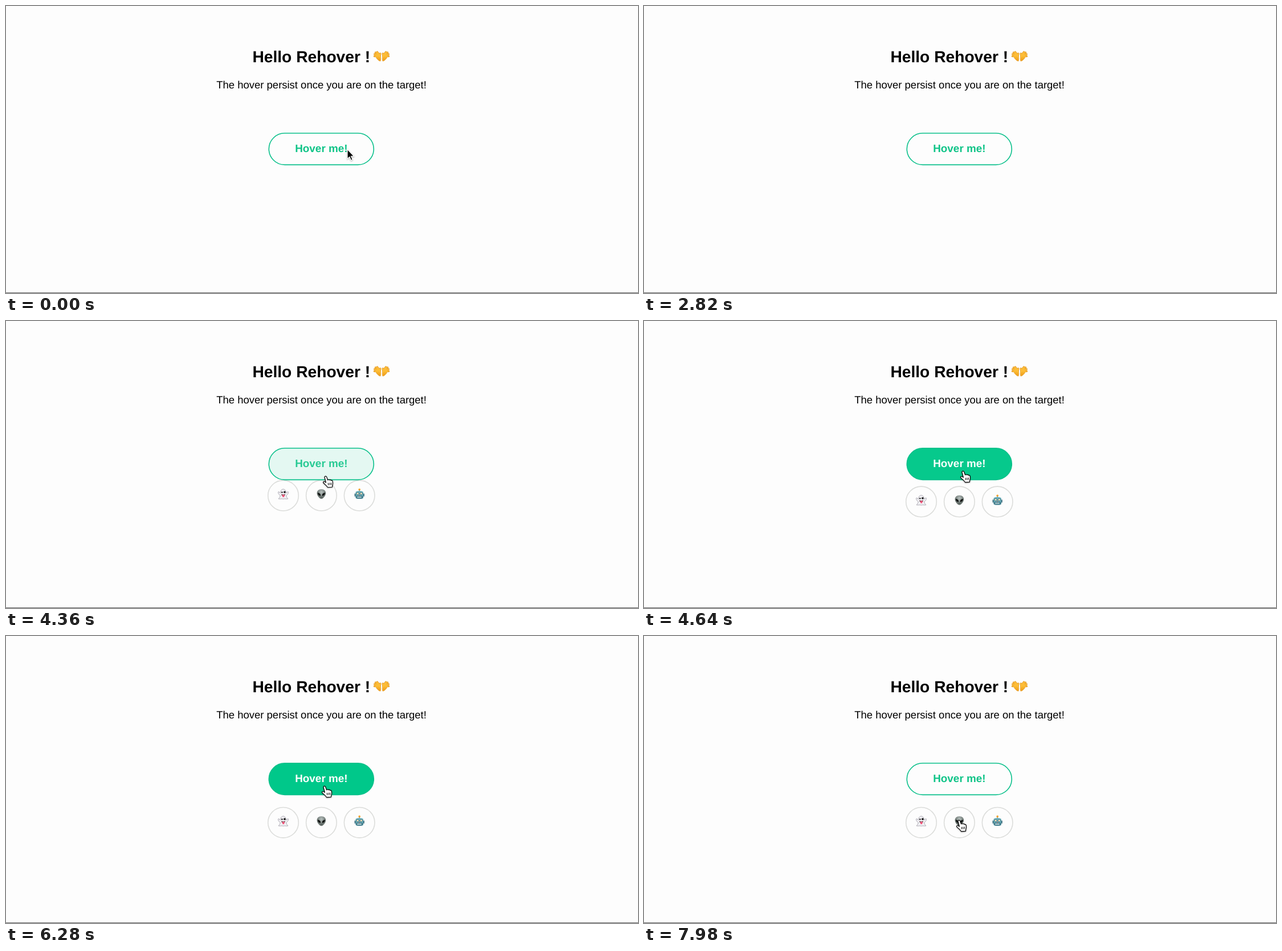
Animation, 1109 px wide and 505 px high, one loop 8000 ms. Source, as an HTML page:

```html
<!DOCTYPE html>
<html lang="en">
<head>
<meta charset="utf-8">
<title>Persistent hover</title>
<style>
  html, body { margin: 0; width: 100%; height: 100%; overflow: hidden; background: #fdfdfd; }
  svg { display: block; }
  text { font-family: "Liberation Sans", Arial, sans-serif; text-rendering: geometricPrecision; }
  .bold { font-weight: bold; }
</style>
</head>
<body>
<svg width="1109" height="505" viewBox="0 0 1109 505">
  <defs>
    <linearGradient id="skin" x1="0" y1="0" x2="0" y2="1">
      <stop offset="0" stop-color="#ffc83a"/><stop offset="1" stop-color="#ee9a1c"/>
    </linearGradient>
    <radialGradient id="gray" cy=".3"><stop stop-color="#b9c2c0"/><stop offset="1" stop-color="#69736f"/></radialGradient>
    <g id="palm" stroke-linecap="round" fill="none">
      <path d="M-4-3L-12.3-4.6M-4-2L-12.6-1.2M-4-4L-10.6-7.6M-4-4L-7.6-8.6M-3 0L-2.2-5.6" stroke="#d98a1b" stroke-width="3.2"/>
      <path d="M-11-2C-9-5-5-6-2.2-2C-1 1-1 5-2 7.6C-6 7-10 2-11-2Z" fill="url(#skin)" stroke="#e39a24" stroke-width=".6"/>
      <path d="M-4-3L-12.3-4.6M-4-2L-12.6-1.2M-4-4L-10.6-7.6M-4-4L-7.6-8.6M-3 0L-2.2-5.6" stroke="#fdbd38" stroke-width="2.1"/>
    </g>
    <circle id="ring" r="26.8" fill="#fdfdfd" stroke="#dcdddb" stroke-width="1.6"/>
  </defs>
  <rect width="1109" height="505" fill="#fdfdfd"/>
  <rect y="504" width="1109" height="1" fill="#666"/>

  <text class="bold" x="432.4" y="99.4" font-size="28.2">Hello Rehover !</text>
  <g transform="translate(659 89.5)"><use href="#palm"/><use href="#palm" transform="scale(-1 1)"/></g>
  <text x="553.6" y="145" font-size="18.48" text-anchor="middle">The hover persist once you are on the target!</text>

  <g id="menu">
    <g transform="translate(486.5)">
      <use href="#ring"/>
      <g transform="translate(0 -2.5)">
        <path d="M-5-2C-5-11 5-11 5-2L8.4-4.4C10-3 8 1 5.2 2.4C5.4 5 7 6.8 8.4 8.2C5 9 3 7.6 0 8.6C-3 7.6-5 9-8.4 8.2C-7 6.8-5.4 5-5.2 2.4C-8 1-10-3-8.4-4.4Z" fill="#f1f0f4" stroke="#a2a0aa" stroke-width=".9"/>
        <circle cx="-2.2" cy="-3.2" r="1.3" fill="#222"/><circle cx="2.4" cy="-3.6" r="1.9" fill="#222"/>
        <path d="M-3.4 0Q0 1.6 3.6 0Q3 3 0 3T-3.4 0Z" fill="#56252f"/>
        <path d="M-1.6 1.2H2V4.4Q.2 6.4-1.6 4.4Z" fill="#f2577c"/>
      </g>
    </g>
    <g transform="translate(553.4)">
      <use href="#ring"/>
      <g transform="translate(0 -2.5)">
        <path d="M0-8.6C5-8.6 8-5.4 7.8-1.4C7.4 3 3 8.4 0 8.4S-7.4 3-7.8-1.4C-8-5.4-5-8.6 0-8.6Z" fill="url(#gray)"/>
        <path d="M-6.4-2.4C-3-2.4-1 0-1.4 3C-4.6 3-6.4 1-6.4-2.4ZM6.4-2.4C3-2.4 1 0 1.4 3C4.6 3 6.4 1 6.4-2.4Z" fill="#121514"/>
        <path d="M-1.5 5.5Q0 6.2 1.5 5.5" fill="none" stroke="#3e4644" stroke-width=".8"/>
      </g>
    </g>
    <g transform="translate(620.2)">
      <use href="#ring"/>
      <g transform="translate(0 -2.5)">
        <path d="M0-5V-8" stroke="#77848a" stroke-width="1.4"/><circle cy="-8.2" r="1.8" fill="#f0a12c"/>
        <path d="M-8.6-1H8.6V4H-8.6Z" fill="#3c6b7b"/>
        <path d="M-6.8-3Q-6.6-5.6 0-5.6T6.8-3V6Q6.6 8.2 0 8.2T-6.8 6Z" fill="#68aeba"/>
        <path d="M-6.4 2.8H6.4V6Q6 8.2 0 8.2T-6.4 6Z" fill="#477f8e"/>
        <g fill="#f6e9c4" stroke="#35606e" stroke-width=".8"><circle cx="-3.1" cy="-1" r="2"/><circle cx="3.1" cy="-1" r="2"/></g>
        <path d="M-1 2.6L0 .8L1 2.6Z" fill="#d75244"/>
        <path d="M-3.6 5.2H3.6" stroke="#e5eff0" stroke-width="1.8" stroke-dasharray="1.3 .5"/>
      </g>
    </g>
  </g>

  <rect x="461.3" y="223.8" width="184" height="55.6" rx="27.8" fill="#fdfdfd"/>
  <rect id="button" x="461.3" y="223.8" width="184" height="55.6" rx="27.8" fill="#00c88a" stroke="#0bc08b" stroke-width="1.6"/>
  <text id="label" class="bold" x="507.2" y="257" font-size="18.9">Hover me!</text>

  <g id="cursor" style="filter:drop-shadow(0 1px 1px #0005)">
    <path id="arrow" d="M0 0V17L3.9 13.4L6.5 19.6L9.2 18.5L6.6 12.4H11.6Z" stroke="#fff" stroke-width="1.2"/>
    <g id="hand" stroke="#000" stroke-width="1.2" stroke-linejoin="round">
      <path d="M-2 2C-2-.2 .8-.4 1.6 1.4L3.6 7C4 5.8 6 5.6 6.6 7C7.4 6 9 6.2 9.5 7.8C10.4 7 12 7.6 12.2 9.2C12.7 12 12.7 14 11.8 16L11.4 19.3L3.6 19.8C2 17-1.5 14.5-4 11.8C-5.2 10.2-3 8.8-1.5 10L.4 11.2Z" fill="#fff"/>
      <path d="M4.2 12L4.8 16M6.8 11.8L7.3 15.8M9.3 11.6L9.7 15.4" fill="none" stroke-width="1"/>
    </g>
  </g>
</svg>
<script>
const LOOP = 8000, ENTER = 4320, LEAVE = 6855, MENU_HOVER = 7160, FADE = 400;
const $ = id => document.getElementById(id);
const clamp = v => Math.max(0, Math.min(1, v));
const mix = (a, b, p) => a + (b - a) * p;

// Cursor hotspot: time, x, y
const path = [
  [0, 599, 252], [1800, 599, 252], [2350, 590, 520], [3500, 575, 520],
  [4080, 566, 318], [4320, 562, 279], [4360, 561, 273], [4640, 560, 264],
  [6280, 559, 264], [6700, 559, 264], [6855, 558, 280], [7020, 556, 292],
  [7400, 554, 316], [7980, 553, 324], [8000, 553, 324]
];

// CSS "ease": cubic-bezier(.25, .1, .25, 1)
function ease(x) {
  const bezier = (a, b, u) => 3 * a * u * (1 - u) ** 2 + 3 * b * u * u * (1 - u) + u ** 3;
  let low = 0, high = 1;
  for (let i = 0; i < 16; i++) {
    const mid = (low + high) / 2;
    if (bezier(.25, .25, mid) < x) low = mid; else high = mid;
  }
  return bezier(.1, 1, low);
}

function cursorAt(t) {
  const i = path.findIndex(k => k[0] > t);
  const a = path[i - 1], b = path[i], p = (t - a[0]) / (b[0] - a[0]);
  return [mix(a[1], b[1], p), mix(a[2], b[2], p)];
}

function draw(t) {
  const hover = ease(clamp((t - ENTER) / FADE)) - ease(clamp((t - LEAVE) / FADE));
  $('button').setAttribute('fill-opacity', clamp(hover));
  $('label').setAttribute('fill', `rgb(${[16, 196, 136].map(c => Math.round(mix(c, 255, clamp(hover))))})`);

  const slide = Math.sin(clamp((t - 4340) / 850) * Math.PI / 2);
  $('menu').setAttribute('transform', `translate(0 ${mix(306.3, 328.3, slide)})`);
  $('menu').setAttribute('opacity', clamp((t - ENTER) / 40));

  const pointing = t >= ENTER && t < LEAVE || t >= MENU_HOVER;
  $('cursor').setAttribute('transform', `translate(${cursorAt(t)})`);
  $('hand').setAttribute('visibility', pointing ? 'visible' : 'hidden');
  $('arrow').setAttribute('visibility', pointing ? 'hidden' : 'visible');
}

const start = performance.now();
function tick() {
  draw((performance.now() - start) % LOOP);
  requestAnimationFrame(tick);
}
tick();
</script>
</body>
</html>
```
